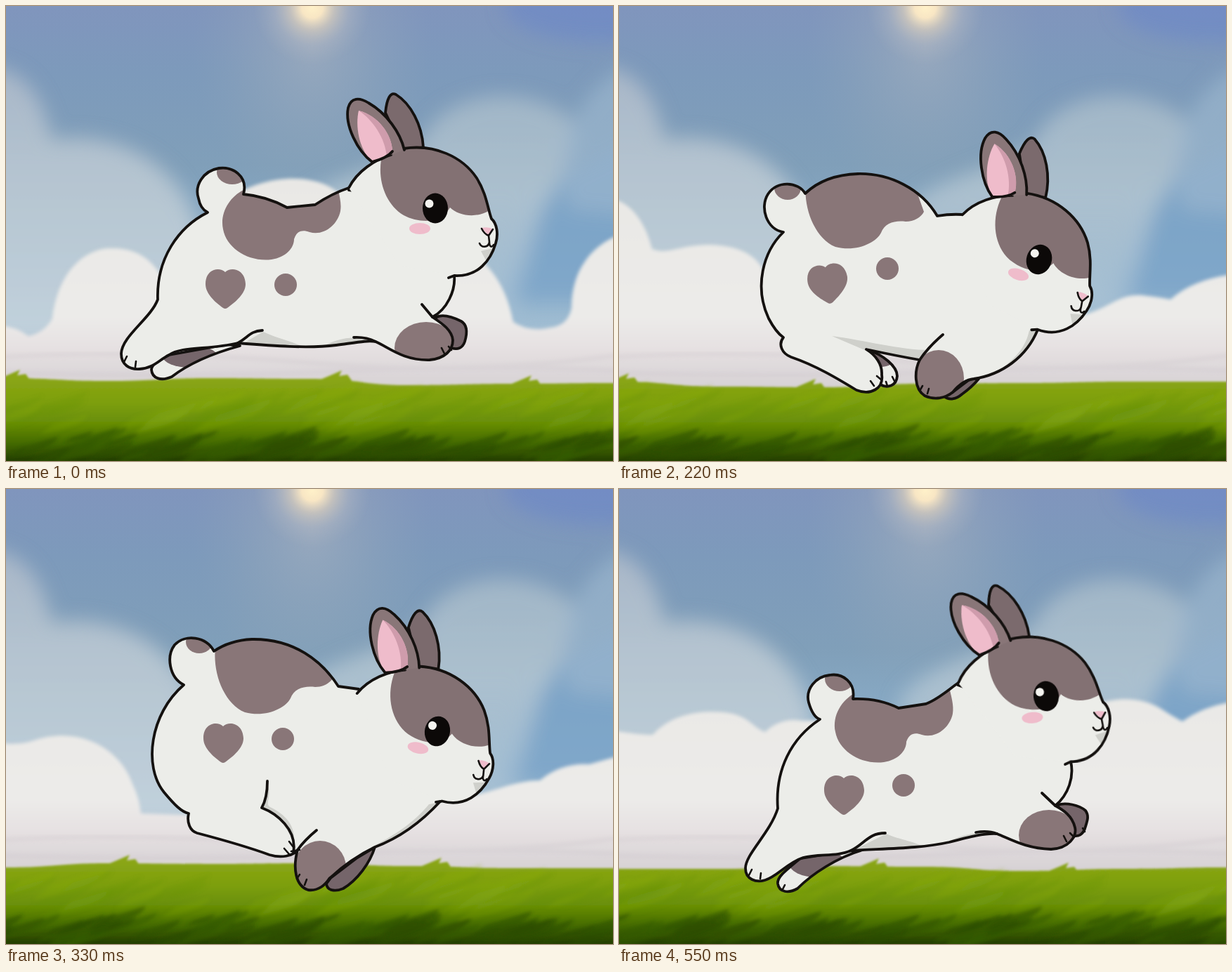
An HTML page that plays this animation: 864 by 648 pixels, repeating every 0.66 s.

```html
<!DOCTYPE html>
<html lang="en">
<head>
<meta charset="utf-8">
<title>Running rabbit</title>
<style>
html, body { margin: 0; width: 100%; height: 100%; overflow: hidden; background: #7f9db8; }
svg { display: block; width: 100vw; height: 100vh; }
.ink { fill: none; stroke: #14110f; stroke-width: 3.8; stroke-linecap: round; stroke-linejoin: round; }
.thin { stroke-width: 2.6; }
.white { fill: #ecede9; }
.fur { fill: #897678; }
.cap { fill: #837173; }
.dusk { fill: #75656a; }
.shade { fill: #cfd0cb; }
.pink { fill: #efbccb; }
</style>
</head>
<body>
<svg viewBox="0 0 864 648" preserveAspectRatio="none">
  <defs>
    <linearGradient id="skyFill" x2="0" y2="1">
      <stop offset="0" stop-color="#8095bd"/><stop offset=".15" stop-color="#7d9abb"/>
      <stop offset=".35" stop-color="#809fb9"/><stop offset=".55" stop-color="#8cafca"/>
      <stop offset=".75" stop-color="#a6c1d5"/>
    </linearGradient>
    <linearGradient id="leftHaze" x2="0" y2="1">
      <stop offset="0" stop-color="#aab7c8"/><stop offset=".4" stop-color="#b7c6d1"/>
      <stop offset="1" stop-color="#c3d2dc"/>
    </linearGradient>
    <linearGradient id="rightHaze" x2="0" y2="1">
      <stop offset="0" stop-color="#a5b9c9"/><stop offset=".45" stop-color="#b0c3d0"/>
      <stop offset="1" stop-color="#b4c9d8" stop-opacity=".5"/>
    </linearGradient>
    <linearGradient id="cloudFill" gradientUnits="userSpaceOnUse" x1="0" y1="250" x2="0" y2="545">
      <stop offset="0" stop-color="#e9e8e5"/><stop offset=".65" stop-color="#ecebe9"/>
      <stop offset=".8" stop-color="#e6e1e2"/><stop offset="1" stop-color="#d6d1d4"/>
    </linearGradient>
    <linearGradient id="grassFill" gradientUnits="userSpaceOnUse" x1="0" y1="528" x2="0" y2="648">
      <stop offset="0" stop-color="#8ba616"/><stop offset=".3" stop-color="#7d9f0c"/>
      <stop offset=".55" stop-color="#688e06"/><stop offset=".8" stop-color="#426802"/>
      <stop offset="1" stop-color="#243d00"/>
    </linearGradient>
    <radialGradient id="sunFill">
      <stop offset="0" stop-color="#fff1c9"/><stop offset=".18" stop-color="#f8e6c4"/>
      <stop offset=".38" stop-color="#d3cabd" stop-opacity=".75"/>
      <stop offset=".65" stop-color="#b4b9c3" stop-opacity=".4"/>
      <stop offset="1" stop-color="#a3b0c0" stop-opacity="0"/>
    </radialGradient>
    <radialGradient id="glowFill">
      <stop offset="0" stop-color="#a9b3bf" stop-opacity=".6"/>
      <stop offset="1" stop-color="#93a6b8" stop-opacity="0"/>
    </radialGradient>
    <filter id="soft"><feGaussianBlur stdDeviation="2.5"/></filter>
    <filter id="edge"><feGaussianBlur stdDeviation="1.4"/></filter>
    <filter id="haze" x="-40%" y="-40%" width="180%" height="180%"><feGaussianBlur stdDeviation="14"/></filter>
    <clipPath id="bodyClip"><path id="bodyMask"/></clipPath>
    <clipPath id="hindClip"><path id="hindMask"/></clipPath>
  </defs>

  <rect width="864" height="648" fill="url(#skyFill)"/>
  <ellipse cx="436" cy="60" rx="170" ry="230" fill="url(#glowFill)"/>
  <g filter="url(#haze)">
    <ellipse cx="840" cy="0" rx="130" ry="50" fill="#6b87c8" opacity=".6"/>
    <path d="M740 270L900 190V420H700Z" fill="#7ba4c8" opacity=".8"/>
    <path d="M-40 85C20 85 50 120 65 190C150 178 245 215 275 320L290 480H-40Z" fill="url(#leftHaze)" opacity=".95"/>
    <path d="M400 300C440 245 520 240 590 195C620 125 720 110 790 150C840 180 790 240 760 300L720 440H400Z" fill="url(#rightHaze)" opacity=".9"/>
    <path d="M910 75C850 95 800 140 790 230L800 290L910 300Z" fill="#9bb6cd" opacity=".7"/>
  </g>
  <circle cx="436" cy="2" r="84" fill="url(#sunFill)"/>
  <path id="cloud" fill="url(#cloudFill)" filter="url(#soft)"/>
  <g filter="url(#soft)" fill="none" stroke="#cfc8cd" stroke-width="7" opacity=".3">
    <path d="M-10 500Q200 488 430 508T880 496M-10 522Q260 530 480 520T880 520"/>
  </g>
  <path id="grass" fill="url(#grassFill)" filter="url(#edge)"/>
  <g id="blades" filter="url(#soft)"></g>

  <path id="hindFill" class="white"/>
  <ellipse id="hindSpot" class="dusk" clip-path="url(#hindClip)"/>
  <path id="hindInk" class="ink"/>
  <path id="fore" class="ink" style="fill:#75656a"/>

  <path id="body" class="white"/>
  <g clip-path="url(#bodyClip)">
    <path id="shade" class="shade"/>
    <path id="saddle" class="fur"/>
    <ellipse id="tail" class="fur"/>
    <ellipse id="paw" class="fur"/>
    <path id="heart" class="fur" d="M0-23C-8-31-28-28-28-6C-28 8-14 20-3 28Q0 30 3 28C14 20 29 8 29-6C28-28 8-31 0-23Z"/>
    <circle id="dot" class="fur" r="16"/>
  </g>
  <path id="bodyInk" class="ink"/>
  <path id="line" class="ink"/>
  <path id="toes" class="ink thin"/>

  <g id="head">
    <path class="ink" style="fill:#7b6a6d" d="M540 152C542 132 547 122 555 126C576 139 592 169 594 201L566 206Z"/>
    <path class="white" d="M488 259C500 235 525 219 548 212L566 203C610 196 650 215 670 245C684 267 686 290 691 303C699 310 701 325 697 338C690 362 672 384 638 384L560 370Z"/>
    <path class="cap" d="M534 219C529 250 541 283 566 298C580 306 600 308 612 304C622 300 628 294 632 287C645 300 672 302 688 291C684 262 670 240 655 226C630 205 600 200 566 203Z"/>
    <path class="shade" d="M676 349L697 344C694 352 690 358 683 362Z"/>
    <path class="ink" d="M488 259C500 235 525 219 548 212M566 203C610 196 650 215 670 245C684 267 686 290 691 303C699 310 701 325 697 338C690 362 672 386 638 384L630 387"/>
    <path class="fur" d="M521 222C500 206 482 170 487 145C491 130 503 130 516 138C542 153 561 180 567 205L548 212Z"/>
    <path class="pink" d="M502 149C497 170 502 203 520 221C535 220 548 214 550 207C549 183 530 156 502 149Z"/>
    <path fill="#cf9cac" d="M502 149C522 162 540 188 542 215C547 213 550 210 550 205C549 183 530 156 502 149Z"/>
    <path class="ink" d="M521 222C500 206 482 170 487 145C491 130 503 130 516 138C542 153 561 180 567 205M521 222Q542 217 550 207"/>
    <ellipse cx="589" cy="317" rx="15" ry="8" class="pink"/>
    <ellipse cx="611" cy="288" rx="18" ry="21.5" fill="#0c0908"/>
    <circle cx="602.5" cy="281.5" r="6" fill="#f4f3ef"/>
    <path class="pink" d="M677 316Q687 314 694 318L687 327Z"/>
    <path class="ink thin" d="M677 317Q681 325 687 327L693 318M687 327L688 336M674 338C677 345 687 344 688 336C688 344 692 344 694 340"/>
  </g>
</svg>
<script>
const STEP = 110;
const $ = id => document.getElementById(id);

const saddleLong = "M338 262C318 272 304 295 309 318C314 345 345 365 378 361C398 358 410 345 410 332C414 320 422 318 432 322C452 328 472 312 476 292C478 280 474 268 470 250L400 265Z";
const saddleHigh = "M298 226C294 262 310 305 340 318C370 326 398 312 405 298C410 284 425 280 440 282C452 282 462 276 466 268L440 195L320 190Z";
const saddleLow = "M331 265C325 300 330 345 358 364C385 380 415 378 426 358C434 346 446 342 458 345C480 347 500 325 502 305C503 292 497 282 490 265L443 280L380 250Z";

// head: x, y of the eye and tilt; ellipses: cx, cy, rx, ry
const poses = [
  {
    head: [611, 288, 0], heart: [312, 402, 0], dot: [398, 397],
    saddle: [saddleLong, 0, 0], tail: [322, 237, 22, 17], paw: [598, 487, 45, 37],
    body: "M488 259C470 265 452 275 440 283L400 287C380 276 360 270 338 268C345 242 322 228 303 231C280 235 268 256 274 274C276 285 281 291 287 294C245 315 214 360 216 418C206 445 165 470 164 495C164 511 176 518 190 517C210 516 218 504 232 497C250 484 290 490 330 480C380 484 430 488 470 483C500 479 515 476 526 478C545 486 565 505 603 504C625 502 636 490 636 476C635 462 622 453 607 443C628 432 640 405 638 384",
    line: "M330 480C345 472 347 463 365 462M526 478Q512 471 495 472M607 443L592 425M488 262L495 263",
    toes: "M172 499L168 507M185 506L184 514M620 487L624 495M630 485L634 490",
    shade: "M335 482L366 464C390 475 418 480 425 488L335 486ZM448 487C465 475 490 471 500 473L530 479Z",
    hind: "M232 497C215 505 207 511 207 518C208 530 220 535 236 528C262 508 300 493 333 484L315 482Z", spot: [262, 499, 39, 16],
    fore: "M611 444C622 437 638 444 648 449C658 455 656 468 653 478C650 487 643 490 634 487L625 470Z",
    cloud: "M-9 455Q15 457 32 470Q55 465 66 445C75 370 120 343 152 345C195 345 215 370 230 400C260 300 330 250 400 246C450 244 480 262 500 300C600 320 700 330 722 450Q745 465 775 458Q800 455 805 430C805 375 835 340 873 326",
    edge: [530, 534, 530, 531, 540, 538, 537], tufts: [12, 470, 740]
  },
  {
    head: [644, 323, 10], heart: [328, 385, 11], dot: [411, 397],
    saddle: [saddleLong, 32, -4], tail: [364, 226, 20, 17], paw: [597, 515, 47, 36],
    body: "M528 273C510 275 490 282 477 290Q456 288 437 286C420 272 400 260 381 257C388 235 372 212 348 212C325 212 312 235 315 252C317 263 320 268 325 271C285 288 245 320 243 365C240 395 245 415 252 430C241 445 246 480 243 510C242 530 258 538 272 535C290 530 292 512 299 495C302 485 304 481 306 477C330 480 350 478 370 472C410 485 470 490 525 495C545 505 565 535 600 536C625 537 640 520 637 505C634 490 622 480 616 474C640 460 650 440 654 422",
    line: "M370 472L382 463M525 495Q510 485 497 485M616 474Q607 465 602 455M477 290L471 292M529 273L533 278",
    toes: "M258 524L256 531M273 521L274 530M620 518L624 526M630 515L635 521M303 521L301 528M313 520L314 528",
    shade: "M370 474L384 462C420 480 455 484 500 486L525 497ZM644 423L655 422C650 445 635 462 618 474C635 455 644 440 644 423Z",
    hind: "M306 477L338 481C335 500 328 515 324 524C315 536 295 533 290 524Q300 505 306 477Z", spot: [318, 490, 22, 24],
    fore: "M617 475C635 476 655 486 657 498C656 515 650 524 638 524Z",
    cloud: "M-9 374Q15 372 22 355C50 290 90 262 135 263C200 262 240 290 265 330L420 300L640 380C690 330 750 320 785 350Q815 375 826 414L873 417",
    edge: [527, 526, 530, 533, 534, 530, 531], tufts: [236, 510]
  },
  {
    head: [598, 361, 17], heart: [297, 395, -8], dot: [382, 374],
    saddle: [saddleHigh, -32, 25], tail: [240, 259, 19, 17], paw: [455, 530, 36, 40],
    body: "M489 297Q470 296 453 299C430 260 385 238 340 239C310 240 285 248 265 267C255 250 225 248 212 268C200 287 210 318 234 322C205 350 192 400 213 445C222 462 228 468 234 472C226 482 232 495 245 500C280 512 310 530 338 547C358 555 377 545 374 525C375 510 365 497 352 489C380 495 405 500 428 504C420 520 420 545 435 555C450 562 465 558 475 550C485 538 495 532 505 531C545 525 580 500 596 461",
    line: "M428 504Q440 486 461 468M490 297L496 296",
    toes: "M358 534L363 541M367 527L373 532M432 541L428 548M441 545L439 552M380 535L382 541M389 528L392 534",
    shade: "M303 470C350 476 400 490 442 490L428 507L352 491ZM584 462L596 461C585 495 560 515 535 524C560 505 578 490 584 462Z",
    hind: "M354 490C375 496 396 513 396 527C395 541 382 545 372 539Z", spot: [372, 500, 22, 14],
    fore: "M475 550L463 556C470 562 480 560 488 553Q502 543 512 531L500 531Z",
    cloud: "M-9 275C20 280 40 315 47 346C70 355 85 340 130 340C180 342 200 360 210 385L420 400L660 440C700 430 710 410 745 412Q770 415 785 418Q815 390 873 382",
    edge: [535, 542, 543, 538, 537, 535, 535], tufts: [6, 272]
  },
  {
    head: [614, 345, 12], heart: [309, 361, 0], dot: [394, 356],
    saddle: [saddleHigh, 0, 0], tail: [275, 218, 19, 16], paw: [447, 539, 37, 38],
    body: "M502 285L473 281C450 245 410 213 350 214C330 215 312 220 296 231C285 210 255 206 240 222C228 238 232 268 253 279C205 320 195 395 225 432C240 450 250 460 260 462C257 475 262 487 272 490C310 500 345 510 375 521C392 526 408 523 415 514C408 540 412 565 430 571C445 573 455 563 460 555Q490 527 525 510C565 495 595 470 618 445",
    line: "M409 518C415 485 385 462 364 454Q372 440 372 416M415 514Q425 500 442 486M509 294L512 307",
    toes: "M396 512L403 520M403 502L409 510M418 549L414 555M428 556L425 564M406 516L418 514",
    shade: "M373 422C378 440 368 448 376 453C400 465 412 480 410 505C398 475 380 462 364 455ZM499 286L503 300L511 306L507 288ZM520 510C560 490 585 470 602 449L618 446C595 475 565 495 525 512Z",
    hind: "M400 505L414 514L405 521Z", spot: [0, 0, 0, 0],
    fore: "M462 554L456 562C457 572 468 574 480 569C500 557 518 533 525 510L500 525Z",
    cloud: "M-9 362Q20 365 40 358C110 335 165 375 180 420Q190 440 192 462L420 470L640 440C690 435 720 415 760 415Q790 390 830 392L873 380",
    edge: [539, 533, 534, 533, 537, 540, 540], tufts: [168, 612]
  },
  {
    head: [610, 289, -3.7], heart: [326, 409, 9], dot: [411, 413],
    saddle: [saddleLow, 0, 0], tail: [309, 263, 20, 16], paw: [530, 521, 58, 47],
    body: "M485 268Q480 278 443 296C420 272 370 265 335 276C328 252 300 245 283 258C265 275 268 305 284 315C240 345 215 385 231 440C240 475 258 490 274 506C265 525 280 535 300 545C330 560 355 578 390 577C412 575 420 568 416 558C412 545 400 537 385 527C430 518 460 510 493 492C485 515 488 535 500 545C512 555 528 552 533 545C545 520 565 500 580 478C608 470 620 430 645 384",
    line: "M385 527L369 520M493 492Q495 475 506 461M443 296L450 292M580 478L586 463",
    toes: "M400 560Q408 562 414 570M404 552Q412 553 417 560M508 542L506 548M518 541L521 549",
    shade: "M390 526C420 510 460 505 495 488L492 496ZM632 392L650 386C625 430 610 465 586 475C605 450 622 420 632 392Z",
    hind: "M388 527C415 528 437 543 434 561C432 573 422 576 412 573Z", spot: [400, 528, 22, 9],
    fore: "M478 497C467 512 468 530 482 534L494 533L495 490Z",
    cloud: "M-9 352Q20 348 40 350C90 355 115 400 121 452Q160 475 198 455C205 410 215 390 235 375L420 430L640 424C690 420 705 395 745 393Q772 392 785 385C805 362 835 345 873 328",
    edge: [533, 538, 537, 535, 536, 539, 538], tufts: [28, 318, 752]
  },
  {
    head: [608, 295, -4.7], heart: [320, 435, 0], dot: [405, 422],
    saddle: [saddleLong, -1, 28], tail: [314, 270, 21, 18], paw: [612, 493, 43, 36],
    body: "M483 276C470 285 455 299 437 306L398 312C380 303 360 298 333 299C337 275 318 262 300 265C280 267 265 285 270 304C274 318 280 326 286 328C245 355 222 400 226 455C215 490 180 520 180 540C180 556 195 561 208 557C225 552 240 532 262 525C285 519 310 524 330 515C380 512 430 512 470 503C500 495 520 490 538 491C560 500 580 512 615 513C640 512 652 495 649 482C645 465 632 457 621 451C640 435 648 410 643 388",
    line: "M330 515C350 505 355 490 379 490M538 491Q525 486 508 489M621 451L602 433M482 279L490 282",
    toes: "M189 542L185 550M202 547L201 555M633 494L637 502M642 490L648 496M236 564L233 570M660 483L663 488",
    shade: "M335 514L380 491C400 500 425 502 435 512L345 518ZM460 507C480 495 500 490 515 490L540 492Z",
    hind: "M258 526C235 545 225 553 226 562C228 575 242 576 254 569C275 548 310 525 347 514L320 516Z", spot: [282, 533, 40, 20],
    fore: "M624 450C636 446 655 450 664 458C670 466 666 474 663 484C660 492 654 495 648 494Z",
    cloud: "M-9 344Q30 350 48 350C75 320 115 315 150 318C185 322 190 340 208 346Q230 325 260 330L640 330C690 290 740 295 770 312Q790 325 802 331Q830 310 873 303",
    edge: [541, 541, 537, 538, 544, 541, 539], tufts: [362, 632]
  }
];

function set(id, attrs) {
  for (const key in attrs) $(id).setAttribute(key, attrs[key]);
}

function oval(id, [cx, cy, rx, ry]) {
  set(id, { cx, cy, rx, ry });
}

function grassPath({ edge, tufts }) {
  const gap = 864 / (edge.length - 1);
  let d = `M-9 660V${edge[0]}H0`;
  edge.slice(1).forEach((y, i) => {
    const mid = (i + .5) * gap;
    d += `C${mid} ${edge[i]} ${mid} ${y} ${(i + 1) * gap} ${y}`;
  });
  d += "H873V660Z";
  for (const x of tufts) {
    const y = edge[Math.round(x / gap)];
    d += `M${x - 40} ${y + 8}Q${x - 10} ${y - 4} ${x + 8} ${y - 12}L${x + 4} ${y - 4}L${x + 16} ${y - 6}L${x + 26} ${y + 8}Z`;
  }
  return d;
}

// Slanted grass strokes, repeated once so that they can scroll
function buildBlades() {
  let seed = 7, html = "";
  const rand = () => (seed = seed * 16807 % 2147483647) / 2147483647;
  const blade = (x, y, len, color, alpha) => {
    for (const left of [x, x + 864]) {
      html += `<path d="M${left} ${y}l${len}-${len * .3}q-${len * .1} ${len * .35}-${len * 1.4} ${len * .6}z" fill="${color}" opacity="${alpha}"/>`;
    }
  };
  for (let i = 0; i < 40; i++) blade(rand() * 864, 558 + rand() * 38, 40 + rand() * 45, i % 2 ? "#8dad18" : "#64900a", .2);
  for (let i = 0; i < 70; i++) {
    const x = rand() * 864;
    blade(x, 617 + 6 * Math.sin(x * Math.PI / 72) + rand() * 22, 30 + rand() * 40, i % 3 ? "#2d4d00" : "#365c02", .55);
  }
  $("blades").innerHTML = html;
}

function draw(index) {
  const p = poses[index];
  const [x, y, tilt] = p.head;
  set("head", { transform: `translate(${x - 611} ${y - 288}) rotate(${tilt} 611 288)` });
  for (const id of ["body", "bodyInk", "bodyMask"]) set(id, { d: p.body });
  for (const id of ["hindFill", "hindInk", "hindMask"]) set(id, { d: p.hind });
  for (const id of ["line", "toes", "shade", "fore"]) set(id, { d: p[id] });
  oval("hindSpot", p.spot);
  oval("tail", p.tail);
  oval("paw", p.paw);
  const [shape, dx, dy] = p.saddle;
  set("saddle", { d: shape, transform: `translate(${dx} ${dy})` });
  const [hx, hy, turn] = p.heart;
  set("heart", { transform: `translate(${hx} ${hy}) rotate(${turn})` });
  set("dot", { cx: p.dot[0], cy: p.dot[1] });
  set("cloud", { d: p.cloud + "V560H-9Z" });
  set("grass", { d: grassPath(p) });
  set("blades", { transform: `translate(${-(index * 230 % 864)} 0)` });
}

let shown = -1;
function tick() {
  const index = Math.floor(performance.now() / STEP) % poses.length;
  if (index !== shown) draw(shown = index);
  requestAnimationFrame(tick);
}

buildBlades();
tick();
</script>
</body>
</html>
```
